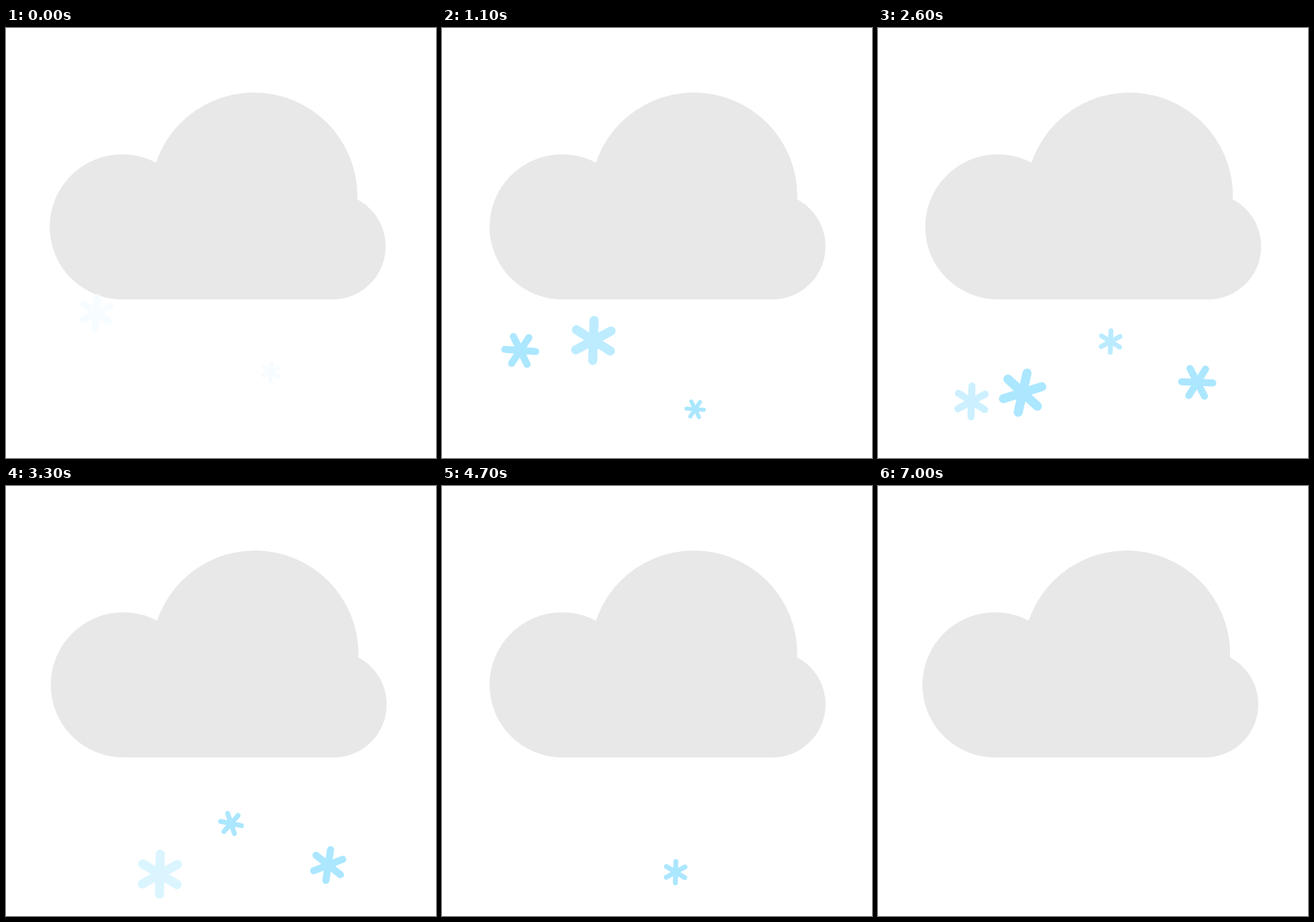
These frames come from a looping animation (640 px wide and 640 px high, 7200 ms). An HTML page with a canvas:

```html
<!DOCTYPE html>
<html lang="en">
<head>
<meta charset="utf-8">
<title>Snow cloud</title>
<style>
  html, body { margin: 0; width: 100%; height: 100%; overflow: hidden; background: #fff; }
  canvas { display: block; width: 100vw; height: 100vh; }
</style>
</head>
<body>
<canvas id="stage" width="640" height="640"></canvas>
<script>
const ctx = document.getElementById('stage').getContext('2d');
const LOOP = 7200, SWAY = 3600, TAU = Math.PI * 2;
const LEAD = 1250, FADE = 280;
const ICE = [171, 231, 255];

// (x, y) is the leftmost point of the fall, reached at time `turn`.
const flakes = [
  { r: 23, x: 116.3, y: 486.3, turn: 1220, life: 2800 },
  { r: 13, x: 376.6, y: 573.8, turn: 1220, life: 2070 },
  { r: 29.8, x: 212.6, y: 518, turn: 2130, life: 2540 },
  { r: 23.2, x: 475, y: 531.6, turn: 2680, life: 2870 },
  { r: 15.9, x: 333.7, y: 519.2, turn: 3620, life: 3230 }
];

// All flakes share one curved fall; u is in seconds from the turn.
const drift = u => 12 * u * u;
const fall = u => 53 * u - 1.4 * u ** 3;
const tilt = u => -0.47 - 0.56 * Math.sin(1.21 * (u + 0.1));

function drawCloud(t) {
  const phase = (t % SWAY) / SWAY;
  ctx.save();
  ctx.translate(9.5 * (1 - Math.abs(1 - 2 * phase)), 0);
  ctx.fillStyle = '#e8e8e8';
  ctx.beginPath();
  for (const [x, y, r] of [[173, 296, 108], [369, 250, 154], [486, 325, 79]]) {
    ctx.moveTo(x + r, y);
    ctx.arc(x, y, r, 0, TAU);
  }
  ctx.rect(173, 296, 313, 108);
  ctx.fill();
  ctx.restore();
}

function drawFlake({ r, x, y, turn, life }, t) {
  const age = t - turn + LEAD;
  const show = Math.min(1, age / FADE, (life - age) / FADE);
  if (show <= 0) return;
  const u = (t - turn) / 1000;
  ctx.save();
  ctx.translate(x + drift(u), y + fall(u));
  ctx.rotate(tilt(u));
  ctx.strokeStyle = `rgb(${ICE.map(v => Math.round(255 - (255 - v) * show))})`;
  ctx.lineWidth = r * 0.455;
  ctx.lineCap = 'round';
  ctx.beginPath();
  for (let i = 0; i < 3; i++) {
    const dx = r * Math.sin(i * Math.PI / 3), dy = r * Math.cos(i * Math.PI / 3);
    ctx.moveTo(dx, -dy);
    ctx.lineTo(-dx, dy);
  }
  ctx.stroke();
  ctx.restore();
}

function draw(now) {
  const time = now % LOOP;
  const step = time < 5600 ? 100 : 200;
  const t = Math.floor(time / step) * step;
  ctx.fillStyle = '#fff';
  ctx.fillRect(0, 0, 640, 640);
  drawCloud(t);
  for (const flake of flakes) drawFlake(flake, t);
}

let start;
function tick(now) {
  start ??= now;
  draw(now - start);
  requestAnimationFrame(tick);
}
draw(0);
requestAnimationFrame(tick);
</script>
</body>
</html>
```
